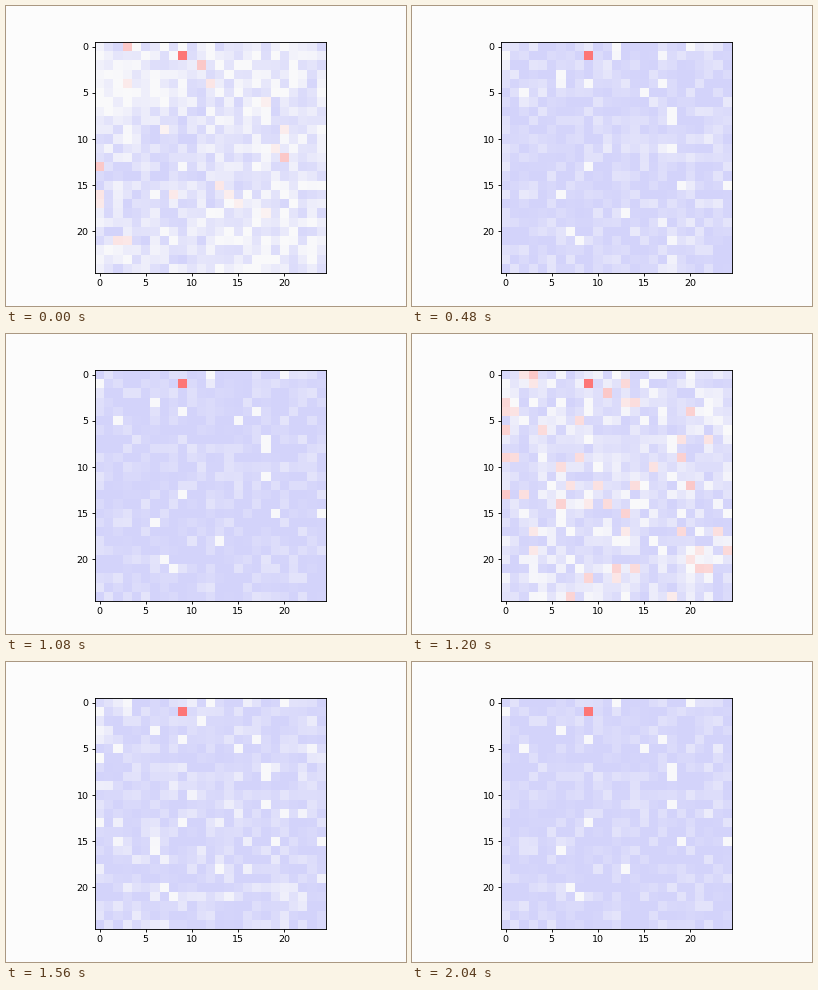
Write a matplotlib script that moves like this. It is 400 px wide and 300 px high and loops after 2.16 s.

```python
import numpy as np
import matplotlib.pyplot as plt
from matplotlib.animation import FuncAnimation
from matplotlib.colors import LinearSegmentedColormap

N = 25
FRAMES, STEP = 18, 120
RESTART = 10          # the field is shaken up again here
PAPER = "#fcfcfc"

PEAK = (9, 1)                                  # column, row
HOT = [(3, 0), (11, 2), (20, 12), (0, 13)]     # warm after every shake
CLEAR = [(16, 2), (1, 5), (6, 4), (16, 20)]    # paler at first
DEEP = [(9, 11), (5, 16)]                      # bluer at first

rng = np.random.default_rng(12)
ys, xs = np.mgrid[:N, :N]


def bumps(centres, radius=4):
    return sum(np.exp(-((xs - x) ** 2 + (ys - y) ** 2) / radius ** 2)
               for x, y in centres)


def put(field, cells, value):
    for x, y in cells:
        field[y, x] = value


def make_run(skew, lift, warm_share, heat):
    """Starting values and lifetimes of one relaxation."""
    start = -1 + rng.random((N, N)) ** skew + lift
    start = np.clip(start, rest, -.03)
    life = np.minimum(1.4 + rng.exponential(1.5, (N, N)), 9)
    warm = (rng.random((N, N)) < warm_share) & ~pale
    start[warm] = heat * rng.uniform(.4, 1.2, warm.sum())
    life[warm] = rng.uniform(1.3, 4.2, warm.sum())
    put(start, HOT, .38)
    put(life, HOT, 4)
    return start, life


# -1 is the blue ground, 0 is white, 1 is the red peak
rest = -1 + .45 * rng.random((N, N)) ** 3
pale = rng.random((N, N)) < .03
rest[pale] = -.07

runs = [
    make_run(1.1, .3 * bumps(CLEAR) - .4 * bumps(DEEP), .03, .16),
    make_run(2, 0, .07, .27),
]


def field_at(i):
    start, life = runs[i >= RESTART]
    k = i % RESTART
    field = rest + (start - rest) * np.exp(-(k / life) ** 3)
    put(field, [PEAK], 1)
    return field


cmap = LinearSegmentedColormap.from_list(
    "heat", ["#d3d3fa", "#fbfbfb", "#fd7676"])
fig, ax = plt.subplots(figsize=(5, 3.75), dpi=80, facecolor=PAPER)
fig.subplots_adjust(left=.1235, right=.8985)
ax.tick_params(labelsize=8.5, length=2.8, pad=3)
image = ax.imshow(field_at(0), cmap=cmap, vmin=-1, vmax=1,
                  interpolation="nearest")


def update(i):
    image.set_data(field_at(i))
    return [image]


anim = FuncAnimation(fig, update, frames=FRAMES, interval=STEP, repeat=True)
plt.show()
```
